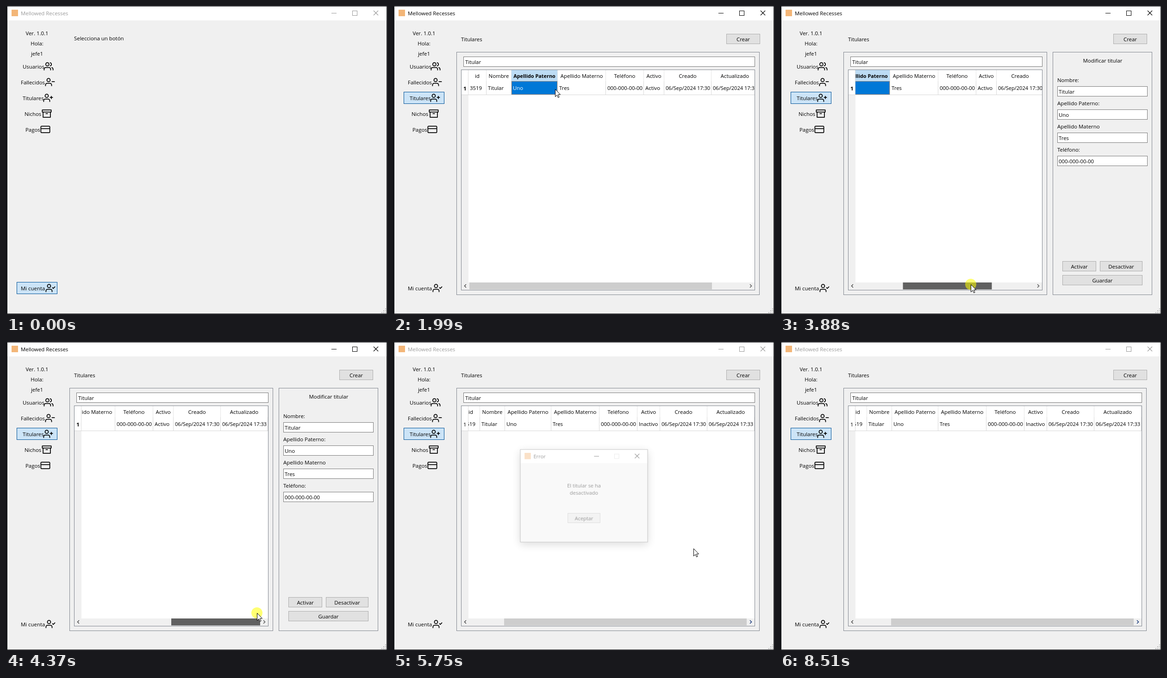
Recreate the animation shown at these times as an HTML page with a canvas. Size 823 by 664 pixels, loop 8570 ms.

```html
<!DOCTYPE html>
<html lang="es">
<head>
<meta charset="utf-8">
<style>
  html, body { margin: 0; width: 100%; height: 100%; overflow: hidden; background: #17181b; }
  canvas { display: block; }
</style>
</head>
<body>
<canvas id="stage" width="823" height="664"></canvas>
<script>
const LOOP = 8570;
const stage = document.getElementById('stage').getContext('2d');
const layerCanvas = Object.assign(document.createElement('canvas'), { width: 823, height: 664 });
const layer = layerCanvas.getContext('2d');
let g = stage;

const APP = 'Mellowed Recesses', USER = 'jefe1', PHONE = '000-000-00-00';
const FONT = '"Open Sans", "Noto Sans", sans-serif';

const person = 'M16 21v-2a4 4 0 0 0-4-4H5a4 4 0 0 0-4 4v2M12.5 7a4 4 0 1 1-8 0a4 4 0 1 1 8 0';
// label, text x, icon centre x, centre y, icon path
const menu = [
  ['Usuarios', 36, 92, 130, 'M17 21v-2a4 4 0 0 0-4-4H5a4 4 0 0 0-4 4v2M13 7a4 4 0 1 1-8 0a4 4 0 1 1 8 0M23 21v-2a4 4 0 0 0-3-3.87M16 3.13a4 4 0 0 1 0 7.75'],
  ['Fallecidos', 32, 95, 164, person + 'M23 11h-6'],
  ['Titulares', 36, 91, 198, person + 'M20 8v6M23 11h-6'],
  ['Nichos', 40, 88, 232, 'M21 8v13H3V8M1 3h22v5H1zM10 12h4'],
  ['Pagos', 42, 85, 266, 'M3 4h18a2 2 0 0 1 2 2v12a2 2 0 0 1-2 2H3a2 2 0 0 1-2-2V6a2 2 0 0 1 2-2zM1 10h22'],
  ['Mi cuenta', 32, 96, 608, person + 'M17 11l2 2 4-4'],
].map(([label, x, cx, cy, d]) => ({ label, x, cx, cy, icon: new Path2D(d) }));

// time, x, y of the pointer tip
const route = [
  [130, 704, 593], [200, 570, 480], [340, 240, 245], [420, 110, 173], [560, 59, 196],
  [1510, 59, 196], [1800, 350, 179], [2330, 350, 179], [2740, 513, 391], [2950, 530, 500],
  [3190, 354, 580], [3330, 311, 613], [3500, 311, 613], [4370, 542, 584], [4440, 542, 584],
  [4580, 587, 592], [4740, 587, 592], [5270, 726, 562], [5600, 726, 562], [5750, 649, 445],
  [6310, 432, 343], [6590, 431, 366], [7070, 431, 366], [7120, 428, 380], [7290, 428, 380],
  [7880, 691, 619], [7920, 691, 619], [8100, 737, 656], [8160, 737, 670],
];
const clicks = [[760, 900], [1850, 1990], [3540, 4440], [5470, 5610], [7120, 7260]];
const arrow = new Path2D('M.5 .5V16.5L4.2 13L6.6 18.4L9 17.4L6.6 12H11.5Z');

const clamp = v => Math.max(0, Math.min(1, v));
const within = (t, a, b) => t >= a && t < b;

function pointerAt(t) {
  if (t < route[0][0] || t >= 8160) return null;
  const i = route.findIndex(k => k[0] > t);
  const [t0, x0, y0] = route[i - 1], [t1, x1, y1] = route[i];
  const p = (t - t0) / (t1 - t0);
  return { x: Math.round(x0 + (x1 - x0) * p), y: Math.round(y0 + (y1 - y0) * p) };
}

function fill(x, y, w, h, color) {
  g.fillStyle = color;
  g.fillRect(x, y, w, h);
}

function box(x, y, w, h, color, border) {
  if (color) fill(x, y, w, h, color);
  g.lineWidth = 1;
  g.strokeStyle = border;
  g.strokeRect(x + .5, y + .5, w - 1, h - 1);
}

function text(s, x, y, { align = 'left', color = '#000', size = 11.4, weight = 400 } = {}) {
  g.font = `${weight} ${size}px ${FONT}`;
  g.textAlign = align;
  g.fillStyle = color;
  g.fillText(s, x, y);
}

const centred = (s, x, y, style) => text(s, x, y, { align: 'center', ...style });

function line(points, color, width = 1) {
  g.beginPath();
  points.forEach(([x, y]) => g.lineTo(x, y));
  g.strokeStyle = color;
  g.lineWidth = width;
  g.stroke();
}

function button(label, x, y, w, tip, pressed) {
  const over = tip && within(tip.x, x, x + w) && within(tip.y, y, y + 22);
  const [bg, border] = !over ? ['#e1e1e1', '#adadad'] : pressed ? ['#cce4f7', '#005499'] : ['#e5f1fb', '#0078d7'];
  box(x, y, w, 22, bg, border);
  centred(label, x + w / 2, y + 16);
}

function captionIcons(minX, maxX, closeX, y, color, maxColor = color) {
  fill(minX, y, 11, 1, color);
  box(maxX, y - 5, 11, 11, null, maxColor);
  line([[closeX, y - 5], [closeX + 10, y + 5]], color, 1.1);
  line([[closeX + 10, y - 5], [closeX, y + 5]], color, 1.1);
}

const logo = (x, y) => fill(x, y, 14, 14, '#f3b678');

function drawWindow(active) {
  const ink = active ? '#000' : '#999';
  fill(0, 0, 823, 664, '#17181b');
  fill(3, 1, 819, 30, '#fff');
  fill(3, 31, 819, 632, '#f0f0f0');
  logo(12, 8);
  text(APP, 32, 20, { color: ink });
  captionIcons(703, 748, 794, 15, ink);
  for (let i = 0; i < 3; i++)
    for (let j = 0; j <= i; j++) fill(819 - j * 4, 652 + i * 4, 2, 2, '#b4b4b4');
}

function drawMenu(t) {
  centred('Ver. 1.0.1', 67, 63);
  centred('Hola:', 67, 85);
  centred(USER, 67, 107);
  const glow = { 'Titulares': t >= 760 ? 1 : 0, 'Mi cuenta': 1 - clamp((t - 1040) / 270) };
  for (const { label, x, cx, cy, icon } of menu) {
    if (glow[label]) {
      g.globalAlpha = glow[label];
      box(23, cy - 13, 88, 26, '#cce4f7', '#005499');
      g.globalAlpha = 1;
    }
    text(label, x, cy + 5);
    g.save();
    g.translate(cx - 10.5, cy - 10.5);
    g.scale(.875, .875);
    g.strokeStyle = '#000';
    g.lineWidth = 2;
    g.lineCap = g.lineJoin = 'round';
    g.stroke(icon);
    g.restore();
  }
  if (within(t, 760, 1850)) {
    g.setLineDash([1, 1]);
    box(24, 186, 86, 24, null, '#000');
    g.setLineDash([]);
  }
}

function drawTable(t, right, tip) {
  const off = t >= 5680;
  const selected = within(t, 1930, 5680);
  const dragged = within(t, 3540, 4370) ? clamp((tip.x - 311) / 192) : within(t, 4370, 8570) ? 1 : 0;
  const scroll = Math.round(dragged * (off ? 14 : 224));
  const columns = [
    ['id', '3519', 39], ['Nombre', 'Titular', 54], ['Apellido Paterno', 'Uno', 100],
    ['Apellido Materno', 'Tres', 104], ['Teléfono', PHONE, 82],
    ['Activo', off ? 'Inactivo' : 'Activo', off ? 49 : 44],
    ['Creado', '06/Sep/2024 17:30', 102], ['Actualizado', '06/Sep/2024 17:33', 102],
  ];

  box(152, 109, right - 152, 22, '#fff', '#7a7a7a');
  text('Titular', 156, 125);
  box(147, 137, right - 147, 476, '#fff', '#828790');
  fill(148, 192, 15, 404, '#f0f0f0');
  text('1', 152, 182, { weight: selected ? 700 : 400 });
  fill(148, 191, 15, 1, '#d8d8d8');
  fill(162, 138, 1, 54, '#dcdcdc');

  g.save();
  g.beginPath();
  g.rect(163, 138, right - 164, 458);
  g.clip();
  let x = 162 - scroll;
  for (const [head, value, w] of columns) {
    const hit = selected && value === 'Uno';
    if (hit) {
      fill(x + 1, 138, w - 1, 24, '#bcdcf4');
      fill(x + 1, 162, w - 1, 29, '#0078d7');
      g.setLineDash([1, 1]);
      box(x + 1, 162, w - 1, 29, null, '#ff8728');
      g.setLineDash([]);
    }
    centred(head, x + w / 2 + .5, 155, hit ? { weight: 700, size: 10.9 } : {});
    text(value, x + 4, 181, { color: hit ? '#fff' : '#000', size: value.includes('/') ? 11.05 : 11.4 });
    fill(x + w, 138, 1, 24, '#e5e5e5');
    fill(x + w, 162, 1, 30, '#d8d8d8');
    fill(x, 191, w + 1, 1, '#d8d8d8');
    x += w;
  }
  g.restore();

  const wide = right > 600, size = wide ? 524 : 192, room = right - 183 - size + 1;
  fill(148, 596, right - 149, 16, '#f0f0f0');
  fill(165 + room * dragged - (dragged ? 1 : 0), 596, size, 15, within(t, 3540, 4780) ? '#606060' : '#cdcdcd');
  line([[158, 600], [154.5, 603.5], [158, 607]], '#505050', 1.6);
  line([[right - 11, 600], [right - 7.5, 603.5], [right - 11, 607]], off ? '#1f3f7f' : '#606060', 1.6);
}

function drawPanel(t, tip) {
  box(589, 99, 215, 524, null, '#828790');
  centred('Modificar titular', 697, 122);
  [['Nombre:', 'Titular'], ['Apellido Paterno:', 'Uno'], ['Apellido Materno', 'Tres'], ['Teléfono:', PHONE]]
    .forEach(([label, value], i) => {
      const y = 164 + i * 50;
      text(label, 599, y);
      box(599, y + 9, 195, 22, '#fff', '#7a7a7a');
      text(value, 602, y + 25);
    });
  button('Activar', 610, 550, 73, tip);
  button('Desactivar', 691, 550, 92, tip, t >= 5470);
  button('Guardar', 610, 580, 173, tip);
}

function drawDialog(t, tip) {
  const shown = Math.min(clamp((t - 5680) / 175), 1 - clamp((t - 7270) / 140));
  if (!shown) return;
  g = layer;
  g.clearRect(0, 0, 823, 664);
  g.shadowColor = 'rgba(0,0,0,.35)';
  g.shadowBlur = 18;
  g.shadowOffsetY = 5;
  fill(270, 228, 285, 207, '#f0f0f0');
  g.shadowColor = 'transparent';
  fill(270, 228, 285, 31, '#fff');
  box(270, 228, 285, 207, null, '#6c6c6c');
  logo(280, 236);
  text('Error', 300, 248);
  captionIcons(435, 480, 526, 243, '#000', '#ccc');
  centred('El titular se ha', 412.5, 313);
  centred('desactivado', 412.5, 329);
  button('Aceptar', 376, 370, 73, tip, within(t, 7120, 7260));
  g = stage;
  const scale = .947 + .053 * shown;
  g.save();
  g.globalAlpha = shown;
  g.translate(412.5, 331.5);
  g.scale(scale, scale);
  g.drawImage(layerCanvas, -412.5, -331.5);
  g.restore();
}

function drawPointer(t, tip) {
  if (!tip) return;
  if (clicks.some(([a, b]) => within(t, a, b))) {
    g.fillStyle = 'rgba(255,255,0,.55)';
    g.beginPath();
    g.arc(tip.x, tip.y, 12, 0, 7);
    g.fill();
  }
  g.save();
  g.translate(tip.x, tip.y);
  g.fillStyle = '#fff';
  g.strokeStyle = '#000';
  g.lineWidth = 1;
  g.fill(arrow);
  g.stroke(arrow);
  g.restore();
}

function draw(t) {
  const tip = pointerAt(t);
  drawWindow(within(t, 830, 5680) || within(t, 7300, 8440));
  drawMenu(t);
  if (t < 980) {
    text('Selecciona un botón', 147, 74);
  } else {
    const panel = within(t, 2000, 5680);
    text('Titulares', 147, 76);
    button('Crear', 720, 60, 73, tip);
    box(137, 99, panel ? 440 : 655, 524, null, '#828790');
    drawTable(t, panel ? 567 : 782, tip);
    if (panel) drawPanel(t, tip);
  }
  drawDialog(t, tip);
  drawPointer(t, tip);
}

const start = performance.now();
function tick() {
  draw((performance.now() - start) % LOOP);
  requestAnimationFrame(tick);
}
tick();
</script>
</body>
</html>
```
